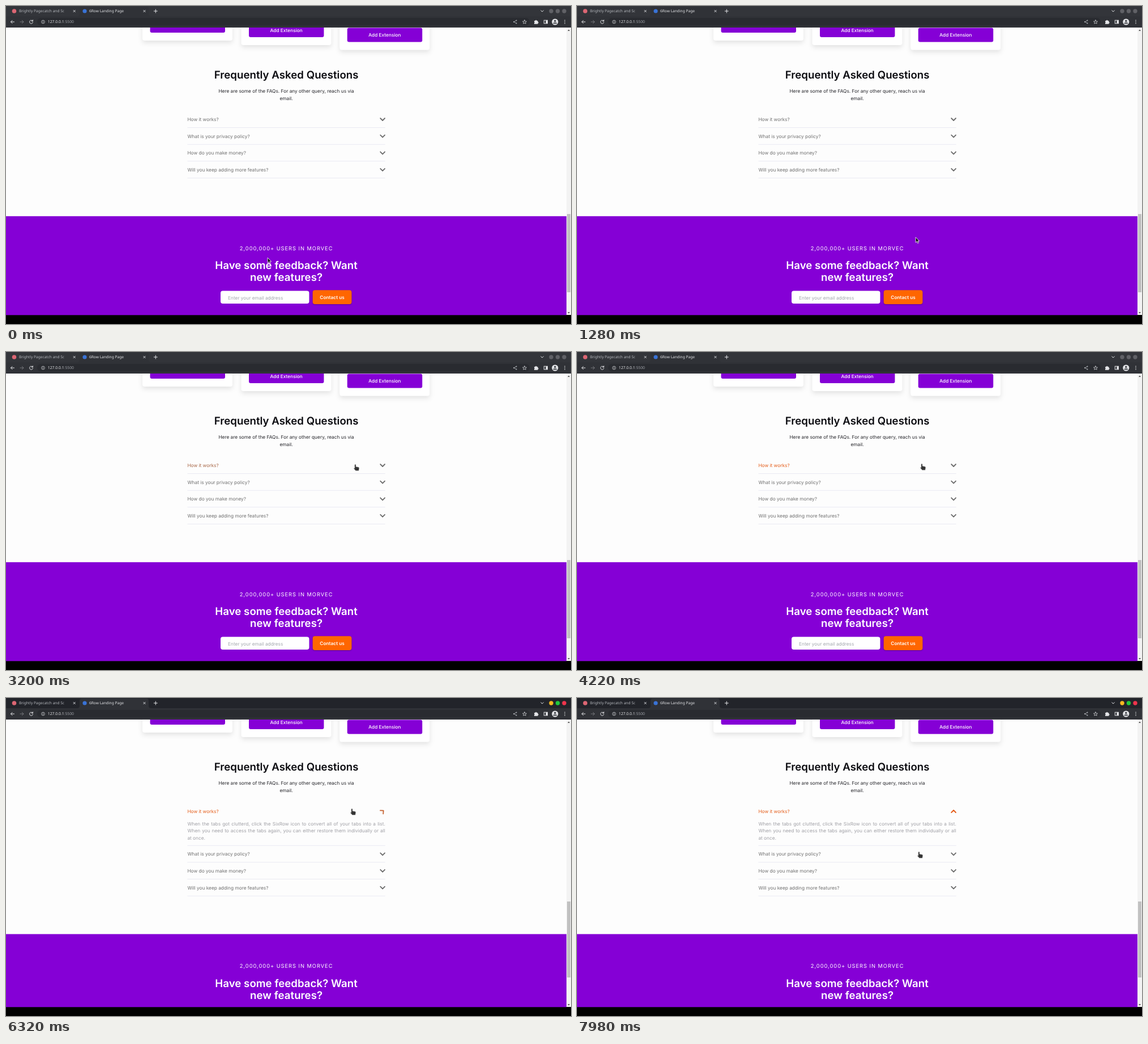
An HTML page for the animation above (8000 ms loop, 998 by 561 pixels).

```html
<!DOCTYPE html>
<html lang="en">
<head>
<meta charset="utf-8">
<title>FAQ accordion</title>
<style>
  html, body { margin: 0; width: 100%; height: 100%; overflow: hidden; background: #000; }
  svg { display: block; width: 998px; height: 561px; }
  text, .answer { font-family: Inter, sans-serif; font-size: 8.32px; text-rendering: geometricPrecision; white-space: pre; }
  .ui { font-family: "Noto Sans", sans-serif; }
  .card { fill: #fff; filter: drop-shadow(0 4px 4px rgba(0, 0, 0, .1)); }
  .line { fill: none; stroke-linecap: round; stroke-linejoin: round; }
  .answer { color: #a0a0a6; line-height: 12.48px; }
  .fill { text-align: justify; text-align-last: justify; white-space: normal; }
</style>
</head>
<body>
<svg id="stage" viewBox="0 0 998 561"></svg>
<script>
const stage = document.getElementById('stage');
const PURPLE = '#8500d6', CENTER = 495.1, LEFT = 320.4, RIGHT = 669.8;
const ROW = 29.63, GROWTH = 45.7;
const LOOP = 8000, HOVER_AT = 3060, FOCUS_AT = 6020, OPEN_AT = 6080, HAND_AT = 2150;

const text = (x, y, str, attrs = '') => `<text x="${x}" y="${y}" ${attrs}>${str}</text>`;
const centered = (y, str, attrs = '', x = CENTER) => text(x, y, str, `text-anchor="middle" ${attrs}`);
const rect = (x, y, w, h, fill, attrs = '') =>
  `<rect x="${x}" y="${y}" width="${w}" height="${h}" fill="${fill}" ${attrs}/>`;
const dot = (x, y, r, fill, attrs = '') => `<circle cx="${x}" cy="${y}" r="${r}" fill="${fill}" ${attrs}/>`;
const line = (d, color, width = 1, attrs = '') =>
  `<path class="line" d="${d}" stroke="${color}" stroke-width="${width}" ${attrs}/>`;

const card = (x, bottom) =>
  rect(x, 0, 159, bottom, '#fff', 'class="card" rx="4"') +
  rect(x + 13.5, bottom - 39, 132.5, 25, PURPLE, 'rx="3"') +
  centered(bottom - 23.2, 'Add Extension', 'fill="#fff" font-weight="500"', x + 79.6);

const row = (label, i) => {
  const y = 200 + i * ROW;
  return text(LEFT, y + 3, label, `fill="#707070" ${i ? '' : 'id="question"'}`) +
    `<g transform="translate(665.2 ${y})">` +
    line('M-3.9 -2 L0 2 L3.9 -2', '#6b6b6b', 1.8, i ? '' : 'id="chevron"') + '</g>';
};
const divider = i => rect(LEFT, 214.2 + i * ROW, RIGHT - LEFT, .7, '#e2e2ee');

const answer = `<foreignObject id="answer" x="${LEFT}" y="216.8" width="${RIGHT - LEFT}" height="40">
  <div xmlns="http://www.w3.org/1999/xhtml" class="answer"><div class="fill">When the tabs got clutterd, click the SixRow icon to convert all of your tabs into a list.</div><div class="fill">When you need to access the tabs again, you can either restore them individually or all</div><div>at once.</div></div>
</foreignObject>`;

const questions = ['How it works?', 'What is your privacy policy?', 'How do you make money?',
  'Will you keep adding more features?'].map(row);

const footer = rect(0, 370.8, 990, 240, PURPLE) +
  centered(430.8, '2,000,000+ USERS IN MORVEC', 'fill="#fff" style="font-size:9.36px;letter-spacing:.1em"') +
  ['Have some feedback? Want', 'new features?'].map((s, i) =>
    centered(464.4 + i * 20.8, s, 'fill="#fff" font-weight="600" style="font-size:18.72px"')).join('') +
  rect(379, 502.5, 156.5, 22.5, '#fff', 'rx="4"') +
  text(392, 517.8, 'Enter your email address', 'fill="#a3a7ae"') +
  rect(541.7, 501.3, 68.8, 24.8, '#ff6600', 'rx="4" style="filter:drop-shadow(0 1px 1px rgba(0,0,0,.3))"') +
  centered(516.8, 'Contact us', 'fill="#fff" font-weight="600"', 576.1);

const page = rect(0, 38, 990, 507, '#fdfdfd') +
  card(241, 61) + card(415.5, 69) + card(589.3, 77.5) +
  centered(127.8, 'Frequently Asked Questions', 'fill="#0b0b10" font-weight="600" style="font-size:18.72px"') +
  centered(153.3, 'Here are some of the FAQs. For any other query, reach us via', 'fill="#26262b"') +
  centered(165.8, 'email.', 'fill="#26262b"') +
  questions[0] + answer +
  `<g id="below">${[0, 1, 2, 3].map(divider).join('')}${questions.slice(1).join('')}${footer}</g>`;

const scrollbar = rect(990, 38, 8, 507, '#f3f3f3') +
  rect(991, 367, 6, 138, '#c1c1c1', 'id="thumb"') +
  '<path d="M992 44h4l-2 -2.5zM992 540h4l-2 2.5z" fill="#505050"/>';

const LIGHT = '#e4e5e8', DIM = '#b4b7bc';
const cross = x => line(`M${x - 1.7} 7.3l3.4 3.4m0 -3.4l-3.4 3.4`, LIGHT, .9);
const browser = rect(0, 0, 998, 19, '#33353a', 'id="strip"') +
  rect(0, 18, 998, 20, '#303237') +
  '<path d="M126 18q4 0 4 -4v-9q0 -4 4 -4h114q4 0 4 4v9q0 4 4 4z" fill="#303237"/>' +
  rect(55, 21, 870, 13.5, '#292b30', 'rx="6.7"') +
  dot(14.5, 9, 3.8, '#dc6673') +
  `<linearGradient id="fade" gradientUnits="userSpaceOnUse" x1="100" x2="114" y1="0" y2="0">
    <stop stop-color="${DIM}"/><stop offset="1" stop-color="${DIM}" stop-opacity="0"/></linearGradient>` +
  text(23, 11.4, 'Brightly Pagecatch and Sc', 'class="ui" fill="url(#fade)" style="font-size:6.6px"') +
  cross(120.7) +
  dot(139, 9, 3.6, '#3973d6') +
  text(147, 11.4, '6Row Landing Page', `class="ui" fill="${LIGHT}" style="font-size:6.6px"`) +
  cross(244.5) +
  line('M261.3 9h6m-3 -3v6', LIGHT) +
  line('M944.8 7.8l2.3 2.3 2.3 -2.3', LIGHT) +
  [963, 974.5, 986].map(x => dot(x, 9, 3.7, '#606166', 'class="control"')).join('') +
  line('M14.5 28h-6m2.6 -2.6l-2.6 2.6 2.6 2.6', LIGHT) +
  line('M25 28h6m-2.6 -2.6l2.6 2.6 -2.6 2.6', '#76787d') +
  line('M47 26.3a3 3 0 1 0 .5 2.5M47.4 24.6v2.2h-2.2', LIGHT) +
  dot(65.5, 28, 2.9, 'none', `stroke="${LIGHT}" stroke-width=".7"`) +
  line('M65.5 27.7v1.6m0 -3v.1', LIGHT, .8) +
  `<text class="ui" x="73.8" y="30.4" fill="${LIGHT}" style="font-size:6.8px">127.0.0.1<tspan fill="#9fa2a8">:5500</tspan></text>` +
  line('M901.5 25.6l-4.5 2.4 4.5 2.4', DIM, .8) +
  [[901.5, 25.6], [897, 28], [901.5, 30.4]].map(([x, y]) => dot(x, y, 1, DIM)).join('') +
  line('M916 24.7l1 2.3 2.5 .2 -1.9 1.6 .6 2.4 -2.2 -1.3 -2.2 1.3 .6 -2.4 -1.9 -1.6 2.5 -.2z', LIGHT, .7) +
  `<path d="M933 26h2a1.2 1.2 0 1 1 2.4 0h2v2a1.2 1.2 0 1 1 0 2.4v1.3h-6.4v-2a1.2 1.2 0 0 0 0 -2.2z" fill="${LIGHT}"/>` +
  rect(950.3, 25.2, 6.2, 5.6, 'none', `stroke="${LIGHT}"`) + rect(953.5, 25.2, 3, 5.6, LIGHT) +
  dot(969.8, 28, 5.6, LIGHT) + dot(969.8, 26.4, 1.8, '#44474d') +
  '<path d="M966.2 31.2q0 -2.2 3.6 -2.2t3.6 2.2z" fill="#44474d"/>' +
  [25.3, 28, 30.7].map(y => dot(987, y, .8, LIGHT)).join('');

const cursor = `<g id="cursor">
  <path id="arrow" d="M0 0v9.4l2.2 -2 1.5 3.4 1.5 -.7 -1.5 -3.2h2.9z" fill="#111" stroke="#fff" stroke-width=".8"/>
  <path id="hand" d="M-1.2 1q1.2 -2 2.4 0v3.2l4.2 .9q1.8 .5 1.5 2.4l-.8 4h-5.4l-3.3 -3.8q-.5 -1.6 1.4 -.7z" fill="#353535" stroke="#eee" stroke-width=".5"/>
</g>`;

stage.innerHTML = page + scrollbar + browser + rect(0, 545.3, 998, 16, '#000') + cursor;
const el = id => document.getElementById(id);
const controls = [...document.querySelectorAll('.control')];

// Pointer tip: time, x, y
const PATH = [
  [0, 462, 444], [820, 500, 439], [1280, 598, 408], [1560, 638, 372], [1660, 638, 372],
  [2400, 668, 221], [2500, 668, 221], [3200, 617, 198], [3640, 616, 199], [3900, 616, 199],
  [4360, 606, 196], [5340, 606, 196], [5720, 611, 194], [6100, 611, 195], [7600, 611, 195],
  [7720, 607, 199], [7820, 607, 199], [7980, 604, 271], [8000, 604, 271]
];
function pointerAt(t) {
  const i = Math.max(1, PATH.findIndex(p => p[0] >= t));
  const [t0, x0, y0] = PATH[i - 1], [t1, x1, y1] = PATH[i];
  const k = (t - t0) / (t1 - t0);
  return [x0 + (x1 - x0) * k, y0 + (y1 - y0) * k];
}

// 500 ms ease-out transition
function transition(t, start) {
  const p = Math.min(1, Math.max(0, (t - start) / 500));
  return 1 - (1 - p) ** 2;
}
const mix = (a, b, k) => `rgb(${a.map((v, i) => Math.round(v + (b[i] - v) * k))})`;
const GREY = [110, 110, 110], ORANGE = [228, 92, 24];

function draw(t) {
  const focused = t >= FOCUS_AT, open = t >= OPEN_AT, turn = transition(t, OPEN_AT);
  el('question').setAttribute('fill', mix(GREY, ORANGE, transition(t, HOVER_AT)));
  el('chevron').setAttribute('transform', `rotate(${-180 * turn})`);
  el('chevron').setAttribute('stroke', mix(GREY, ORANGE, turn));
  el('answer').style.display = open ? '' : 'none';
  el('below').setAttribute('transform', `translate(0 ${open ? GROWTH : 0})`);
  el('thumb').setAttribute('y', open ? 359 : 367);
  el('thumb').setAttribute('height', open ? 134 : 138);
  el('strip').setAttribute('fill', focused ? '#22242a' : '#33353a');
  controls.forEach((c, i) =>
    c.setAttribute('fill', focused ? ['#f6b820', '#20c83c', '#f0344c'][i] : '#606166'));
  el('cursor').setAttribute('transform', `translate(${pointerAt(t)})`);
  el('arrow').style.display = t < HAND_AT ? '' : 'none';
  el('hand').style.display = t < HAND_AT ? 'none' : '';
}

function frame() {
  draw(performance.now() % LOOP);
  requestAnimationFrame(frame);
}
frame();
</script>
</body>
</html>
```
